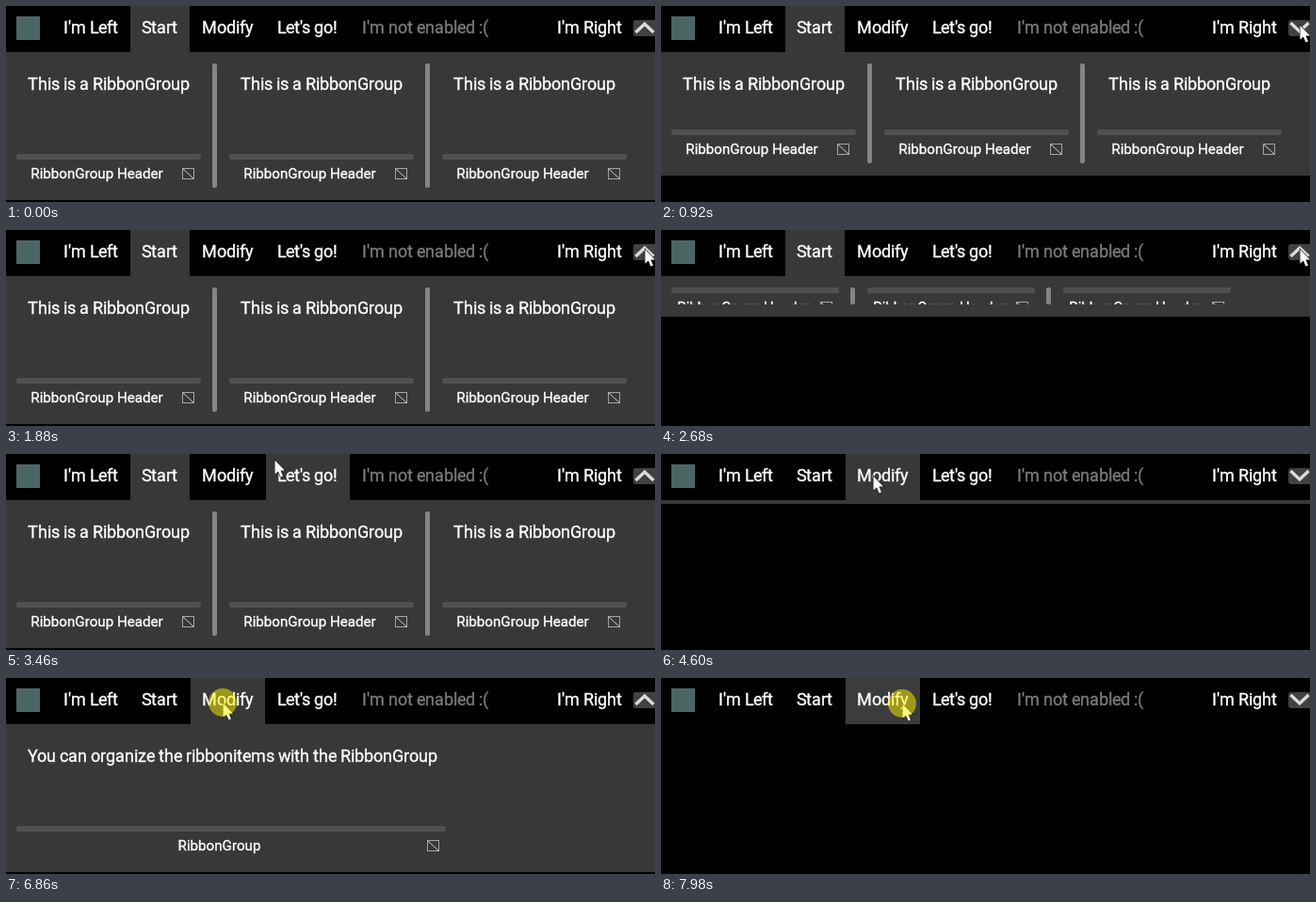
Write an HTML page with a canvas that moves like this. It is 689 by 208 pixels and loops after 8000 ms.

```html
<!DOCTYPE html>
<html lang="en">
<head>
<meta charset="utf-8">
<title>Ribbon demo</title>
<style>
html, body { margin: 0; width: 100%; height: 100%; overflow: hidden; background: #000; }
canvas { display: block; width: 689px; height: 208px; }
</style>
</head>
<body>
<canvas id="stage" width="689" height="208"></canvas>
<script>
const W = 689, H = 208, LOOP = 8000;
const BAR = 49, FULL = 157, UNFOLD = 365, FOLD = 310, HOLD = 90;
const PAD = 12, HEAD = 36, SURFACE = '#383838';
const ctx = document.getElementById('stage').getContext('2d');

const tab = (label, x, end, off) => ({ label, x, end, off });
const tabs = [
  tab("I'm Left", 49, 131), tab('Start', 132, 195), tab('Modify', 196, 275),
  tab("Let's go!", 276, 365), tab("I'm not enabled :(", 366, 524, true), tab("I'm Right", 573, 664)
];

const group = (text, head, wide, narrow) => ({ text, head, wide, narrow });
const pages = {
  Start: Array(3).fill(group('This is a RibbonGroup', 'RibbonGroup Header', 196, 178)),
  Modify: [group('You can organize the ribbonitems with the RibbonGroup', 'RibbonGroup', 456, 126)]
};

// Pointer moves: from time, to time, x, y
const moves = [
  [200, 370, 678, 20], [3010, 3460, 285, 6], [3570, 3670, 262, 14], [3850, 4000, 225, 23],
  [5440, 5520, 189, 29], [6530, 6620, 230, 26], [7130, 7240, 284, 38], [7490, 7610, 256, 27]
];
const presses = [780, 1330, 2000, 2490, 3970, 4208, 5051, 5910, 6630, 6780, 7950];

function pointer(t) {
  let x = 688, y = 200;
  for (const [from, to, tx, ty] of moves) {
    const k = Math.min(1, Math.max(0, (t - from) / (to - from)));
    const ease = k * k * (3 - 2 * k);
    x += (tx - x) * ease;
    y += (ty - y) * ease;
  }
  return { x: Math.round(x), y: Math.round(y) };
}

const tabAt = p => tabs.find(b => !b.off && p.y < BAR && p.x >= b.x && p.x < b.end);

// Another page's tab switches pages; the current tab or the arrow folds the panel.
function stateAt(t) {
  const s = { page: 'Start', open: true, since: -UNFOLD };
  for (const press of presses) {
    const release = press + HOLD;
    if (release > t) break;
    const hit = tabAt(pointer(press));
    if (hit && hit.label !== s.page) {
      s.page = hit.label;
    } else {
      s.open = !s.open;
      s.since = release;
    }
  }
  const k = Math.min(1, (t - s.since) / (s.open ? UNFOLD : FOLD));
  s.height = Math.round(FULL * (s.open ? k : 1 - k));
  return s;
}

function box(x, y, w, h, r, color) {
  ctx.fillStyle = color;
  ctx.beginPath();
  ctx.roundRect(x, y, w, h, r);
  ctx.fill();
}

function line(points, color, width, close) {
  ctx.strokeStyle = color;
  ctx.lineWidth = width;
  ctx.beginPath();
  points.forEach(([x, y]) => ctx.lineTo(x, y));
  if (close) ctx.closePath();
  ctx.stroke();
}

function glyphs(str, x, y, color) {
  ctx.fillStyle = ctx.strokeStyle = color;
  ctx.lineWidth = 0.35;
  ctx.fillText(str, x, y);
  ctx.strokeText(str, x, y);
}

// Letters advance by whole pixels, as in hinted text.
function label(str, x, y, color = '#fff') {
  ctx.font = '18px Roboto, sans-serif';
  ctx.textAlign = 'left';
  const width = s => ctx.measureText(s).width;
  for (let i = 0; i < str.length; i++) {
    const next = str[i + 1] || '';
    glyphs(str[i], x, y, color);
    x += Math.floor(width(str[i] + next) - width(next) + 0.3);
  }
}

function caption(str, x, y) {
  ctx.font = '15.15px Roboto, sans-serif';
  ctx.textAlign = 'center';
  glyphs(str, x, y, '#fff');
}

function clip(x, y, w, h, paint) {
  ctx.save();
  ctx.beginPath();
  ctx.rect(x, y, w, h);
  ctx.clip();
  paint();
  ctx.restore();
}

function drawLauncher(x, y) {
  ctx.strokeStyle = '#a4a4a4';
  ctx.lineWidth = 1;
  ctx.strokeRect(x + 0.5, y + 0.5, 12, 11);
  line([[x + 1, y + 1], [x + 12, y + 11]], '#d0d0d0', 1);
}

function drawGroup(g, x, w, top, height) {
  const head = top + Math.max(0, height - HEAD);
  clip(x, top, w, head - top, () => label(g.text, x + PAD, top + 28));
  box(x, head, w, 6, 2, '#505050');
  caption(g.head, x + (w - 25) / 2, head + 26);
  drawLauncher(x + w - 20, head + 15);
}

function drawPanel(groups, h) {
  box(0, BAR, W, h, 0, SURFACE);
  const top = BAR + PAD, height = h - 25;
  if (height <= 0) return;
  clip(0, top, W, height, () => {
    let x = 11;
    groups.forEach((g, i) => {
      const w = height > HEAD ? g.wide : g.narrow;
      if (i) box(x - 18, top, 5, height, 2, '#858585');
      drawGroup(g, x, w, top, height);
      x += w + 30;
    });
  });
}

function drawBar({ page, open, height }, hover) {
  box(11, 11, 25, 25, 0, '#4a6664');
  for (const b of tabs) {
    if (b === hover || b.label === page) {
      box(b.x, 0, b.end - b.x, BAR, 0, height ? SURFACE : '#3c3c3c');
    }
    label(b.label, b.x + PAD, 29, b.off ? '#7a7a7a' : '#fff');
  }
  box(666, 15, 25, 17, 3, '#424242');
  const [edge, tip] = open ? [28, 19] : [18, 27];
  line([[668.5, edge], [678, tip], [687.5, edge]], '#dcdcdc', 3.3);
}

function drawPointer({ x, y }, pressed) {
  const arrow = [[0, 0], [0, 15], [3.5, 12], [6, 18], [8.5, 17], [6, 11], [10.5, 11]]
    .map(([dx, dy]) => [x + 0.5 + dx, y + 0.5 + dy]);
  line(arrow, '#101010', 1.2, true);
  ctx.fillStyle = '#fff';
  ctx.fill();
  if (pressed) box(x - 15, y - 15, 30, 30, 15, 'rgba(255, 245, 0, 0.5)');
}

function draw(t) {
  const state = stateAt(t), mouse = pointer(t);
  const inside = t >= moves[0][0];
  box(0, 0, W, H, 0, '#000');
  if (state.height) drawPanel(pages[state.page], state.height);
  drawBar(state, inside && tabAt(mouse));
  if (inside) drawPointer(mouse, presses.some(p => t >= p && t < p + HOLD));
}

const begin = performance.now();
function frame() {
  draw((performance.now() - begin) % LOOP);
  requestAnimationFrame(frame);
}
frame();
</script>
</body>
</html>
```
